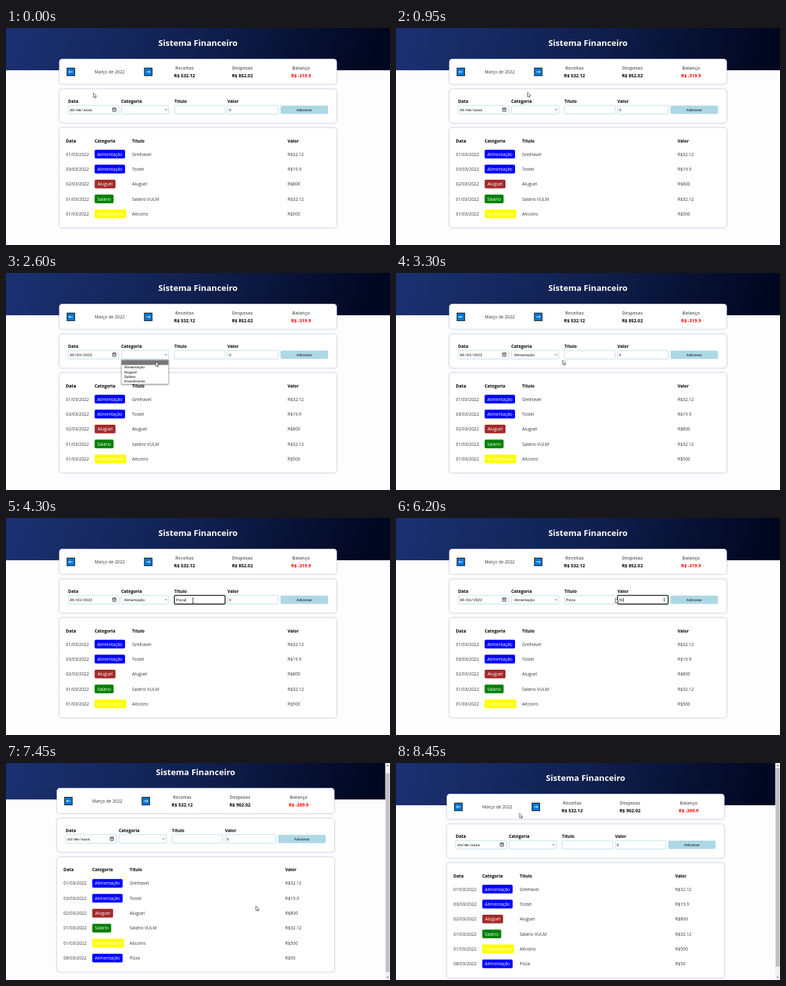
Recreate the animation shown at these times as an HTML page. Size 600x339 px, loop 8.5 s.

```html
<!DOCTYPE html>
<html lang="pt-BR">
<head>
<meta charset="utf-8">
<title>Sistema Financeiro</title>
<style>
html, body { margin: 0; width: 100%; height: 100%; overflow: hidden; background: #fdfdfe; }
svg { display: block; width: 100%; height: 100%; }
text { font: 6.8px "Open Sans", "Noto Sans", sans-serif; fill: #333; white-space: pre; }
.bold { font-weight: 700; font-size: 6.7px; fill: #000; }
.title { font-weight: 700; font-size: 13.1px; fill: #fff; text-anchor: middle; }
.head { font-weight: 700; font-size: 6.9px; fill: #777; text-anchor: middle; }
.sum { font-weight: 700; font-size: 7.1px; fill: #000; text-anchor: middle; }
.neg { fill: #f00; }
.form { font: 5.87px "Liberation Sans", Arial, sans-serif; fill: #111; }
.mid { text-anchor: middle; }
.mono { font: 5.87px "Liberation Mono", monospace; fill: #111; }
.tag { fill: #fff; }
.card { fill: #fff; stroke: #e3e5f0; stroke-width: .7; filter: drop-shadow(0 0 1px rgba(50, 60, 120, .35)); }
.field { fill: #fff; stroke: #add8e6; stroke-width: .8; }
.ring { fill: none; stroke: #101010; stroke-width: 1.3; }
.menu { fill: #fff; stroke: #888; stroke-width: .5; filter: drop-shadow(.6px 1px 1px rgba(0, 0, 0, .4)); }
.line { fill: none; stroke: #222; stroke-width: .8; }
</style>
</head>
<body>
<svg id="stage" viewBox="0 0 600 339">
  <defs>
    <linearGradient id="navy" gradientUnits="userSpaceOnUse" x1="40" y1="-50" x2="545" y2="120">
      <stop offset="0" stop-color="#1b3070"/>
      <stop offset=".5" stop-color="#10204f"/>
      <stop offset="1" stop-color="#020721"/>
    </linearGradient>
  </defs>
</svg>
<script>
const LOOP = 8500, STEP = 50;
const ROW_TOP = 197, ROW_GAP = 23.35;
const BAR = 7.46, MAX_SCROLL = 14, PAGE_H = 353;

const stage = document.getElementById('stage');

function add(parent, tag, attrs = {}, content) {
  const el = document.createElementNS('http://www.w3.org/2000/svg', tag);
  for (const key in attrs) el.setAttribute(key, attrs[key]);
  if (content !== undefined) el.textContent = content;
  parent.append(el);
  return el;
}
const group = parent => add(parent, 'g');
const label = (parent, x, y, content, cls = '') => add(parent, 'text', { x, y, class: cls }, content);
const box = (parent, x, y, width, height, attrs) => add(parent, 'rect', { x, y, width, height, ...attrs });
const path = (parent, d, attrs) => add(parent, 'path', { d, ...attrs });
const show = (el, on) => { el.style.display = on ? '' : 'none'; };
const place = (el, x, y) => el.setAttribute('transform', `translate(${x} ${y})`);
const put = (el, content) => { if (el.textContent !== content) el.textContent = content; };

// Page
const banner = box(stage, 0, 0, 600, 66, { fill: 'url(#navy)' });
const page = group(stage);
label(page, 300, 28.3, 'Sistema Financeiro', 'title');
box(page, 83.3, 48.4, 433.4, 39.2, { rx: 4.5, class: 'card' });
box(page, 83.3, 95.6, 433.4, 52.6, { rx: 4.5, class: 'card' });
const tableCard = box(page, 83.3, 156, 433.4, 156, { rx: 4.5, class: 'card' });

// Month and totals
function arrowButton(x, dir) {
  const g = group(page);
  place(g, x, 68.6);
  box(g, -6, -6, 12, 12, { fill: '#0078d7', stroke: '#111', 'stroke-width': 1 });
  path(g, `M${-3 * dir} 0H${3 * dir}M${1.2 * dir} -1.8L${3 * dir} 0L${1.2 * dir} 1.8`,
    { fill: 'none', stroke: '#fff', 'stroke-width': .9 });
}
arrowButton(101.3, -1);
arrowButton(222.2, 1);
label(page, 162, 71, 'Março de 2022', 'mid');
const [, spent, balance] = [
  [279, 'Receitas', 'R$ 532.12', ''],
  [369.3, 'Despesas', '', ''],
  [461, 'Balanço', '', ' neg']
].map(([x, name, value, cls]) => {
  label(page, x, 65, name, 'head');
  return label(page, x, 76.6, value, 'sum' + cls);
});

// Form
[[97, 'Data'], [180, 'Categoria'], [263, 'Título'], [346, 'Valor']]
  .forEach(([x, name]) => label(page, x, 116.8, name, 'bold'));
const fieldX = { date: 97.3, kind: 180.3, name: 263.3, value: 346.3 };
const rings = {};
for (const key in fieldX) {
  const w = key === 'kind' ? 74 : 79;
  box(page, fieldX[key], 121, w, 13.4, { rx: 1.2, class: 'field' });
  if (key !== 'kind') rings[key] = box(page, fieldX[key] - .2, 120.9, w + .2, 13.6, { rx: 1.5, class: 'ring' });
}
const dateText = label(page, 99.6, 129.8, '', 'mono');
const kindText = label(page, 184.4, 129.8, '', 'form');
const nameText = label(page, 265.6, 129.8, '', 'form');
const picked = box(page, 348.3, 124.3, 3.6, 7, { fill: '#0078d7' });
const valueText = label(page, 348.5, 129.8, '', 'form');
const caret = box(page, 0, 124.2, .5, 7, { fill: '#000' });

const icon = group(page);
box(icon, 166.6, 124.8, 5.2, 5.6, { rx: .6, class: 'line' });
path(icon, 'M166.6 126.4H171.8M168 124V125M170.4 124V125M168 128.4H170.4', { class: 'line' });
path(page, 'M248.4 126.9L249.9 128.4L251.4 126.9', { class: 'line' });
const spinner = path(page, 'M417.6 127L419.2 124.9L420.8 127ZM417.6 128.4L419.2 130.5L420.8 128.4Z', { fill: '#444' });
box(page, 429, 121.2, 74.2, 13, { rx: 2, fill: '#add8e6' });
label(page, 466, 129.8, 'Adicionar', 'form mid');

// Table
[[93.5, 'Data'], [138.5, 'Categoria'], [197, 'Título'], [440, 'Valor']]
  .forEach(([x, name]) => label(page, x, 178.5, name, 'bold'));
const kinds = {
  'Alimentação': ['#00f', 47.5],
  'Aluguel': ['#a52a2a', 32.6],
  'Salário': ['#008000', 29.6],
  'Investimento': ['#ff0', 49.5]
};
const rows = [
  ['01/03/2022', 'Alimentação', 'Grelhavel', 'R$32.12'],
  ['03/03/2022', 'Alimentação', 'Tostel', 'R$19.9'],
  ['02/03/2022', 'Aluguel', 'Aluguel', 'R$800'],
  ['01/03/2022', 'Salário', 'Salário VULM', 'R$32.12'],
  ['01/03/2022', 'Investimento', 'Altcoins', 'R$500'],
  ['08/03/2022', 'Alimentação', 'Pizza', 'R$50']
].map(([date, kind, name, value], i) => {
  const g = group(page), [fill, width] = kinds[kind];
  place(g, 0, ROW_TOP + i * ROW_GAP);
  label(g, 93.5, 2.5, date);
  box(g, 138.5, -6.8, width, 13.6, { rx: 2, fill });
  label(g, 138.5 + width / 2, 2.5, kind, 'tag mid');
  label(g, 197, 2.5, name);
  label(g, 440, 2.5, value);
  return g;
});
const newRow = rows[5];

// Category menu
const menu = group(page);
box(menu, 180.2, 135.4, 73.8, 38.2, { class: 'menu' });
const hover = box(menu, 180.5, 136.2, 73.2, 7.4, { fill: '#767676' });
const options = ['', ...Object.keys(kinds)].map((kind, i) =>
  label(menu, 184.4, 142.2 + i * 7.25, kind, 'form'));

// Scrollbar
const bar = group(stage);
box(bar, 600 - BAR, 0, BAR, 339, { fill: '#f1f1f1' });
path(bar, 'M594.7 5L596.3 3L597.9 5ZM594.7 334L596.3 336L597.9 334Z', { fill: '#505050' });
const track = 323;
const thumb = box(bar, 593.2, 8, 6.2, track * 339 / PAGE_H, { fill: '#c1c1c1' });

// Pointers
const arrow = path(stage, 'M0 0V7.2L1.7 5.7L2.8 8.2L4 7.7L2.9 5.3H5.1Z',
  { fill: '#fff', stroke: '#222', 'stroke-width': .65, 'stroke-linejoin': 'round' });
const beam = path(stage, 'M-1.4 -3.6H1.4M0 -3.6V3.6M-1.4 3.6H1.4', { class: 'line' });

// Timeline tables: [time, value...]
const moves = [
  [0, 136.5, 101.5], [950, 205.5, 100.5], [1300, 112, 127], [2000, 112, 127],
  [2250, 234, 128], [2300, 234, 128], [2450, 234, 138.5], [2650, 234, 138.5],
  [2950, 212, 147], [3100, 212, 147], [3450, 292, 129], [4350, 292, 129],
  [4500, 318, 128], [4800, 400, 127], [4950, 400, 127], [5350, 343, 125.5],
  [6300, 343, 125.5], [6550, 466, 127], [6650, 466, 127], [6850, 390.5, 223.5],
  [7500, 390.5, 223.5], [8450, 193, 78.5]
];
const scrolls = [[0, 0], [6700, 0], [6850, MAX_SCROLL], [7350, MAX_SCROLL], [7600, 0]];
const dates = [
  [0, 'dd/mm/aaaa'], [1450, '09/mm/aaaa'], [1650, '09/03/aaaa'],
  [1750, '09/03/0002'], [1800, '09/03/0020'], [1850, '09/03/0202'],
  [1900, '09/03/2022'], [6600, 'dd/mm/aaaa']
];
const names = [
  [0, ''], [3700, 'P'], [3800, 'Pi'], [3900, 'Piz'], [4000, 'Pizz'], [4150, 'Pizza'], [6600, '']
];
const values = [[0, '0'], [5650, '5'], [5800, '50'], [6600, '0']];
const focus = [[0, ''], [1350, 'date'], [2300, ''], [3500, 'name'], [4850, 'value'], [6600, '']];

const at = (table, t) => table.findLast(entry => entry[0] <= t)[1];

function tween(table, t) {
  const i = table.findLastIndex(entry => entry[0] <= t);
  const a = table[i], b = table[i + 1];
  if (!b) return a.slice(1);
  const k = (t - a[0]) / (b[0] - a[0]), ease = k * k * (3 - 2 * k);
  return a.slice(1).map((v, j) => v + (b[j + 1] - v) * ease);
}

function render(t) {
  const added = t >= 6600;
  const [scroll] = tween(scrolls, t);
  const [x, y] = tween(moves, t);
  const active = at(focus, t);

  place(page, added ? -BAR / 2 : 0, -scroll);
  place(banner, 0, -scroll);
  show(bar, added);
  thumb.setAttribute('y', 8 + scroll * track / PAGE_H);
  show(newRow, added);
  tableCard.setAttribute('height', added ? 156 + ROW_GAP : 156);
  put(spent, added ? 'R$ 902.02' : 'R$ 852.02');
  put(balance, added ? 'R$ -369.9' : 'R$ -319.9');

  put(dateText, at(dates, t));
  put(kindText, t >= 3050 && !added ? 'Alimentação' : '');
  put(nameText, at(names, t));
  put(valueText, at(values, t));
  for (const key in rings) show(rings[key], key === active);
  show(spinner, active === 'value');

  const selecting = t >= 5150 && t < 5650;
  show(picked, selecting);
  valueText.style.fill = selecting ? '#fff' : '';
  const typed = { name: nameText, value: valueText }[active];
  show(caret, typed && !selecting);
  if (typed) caret.setAttribute('x', +typed.getAttribute('x') + typed.getComputedTextLength() + .3);

  show(menu, t >= 2300 && t < 3050);
  const index = Math.max(0, Math.min(4, Math.floor((y - 136.2) / 7.25)));
  hover.setAttribute('y', 136.2 + index * 7.25);
  options.forEach((option, i) => { option.style.fill = i === index ? '#fff' : ''; });

  const overText = y > 121 && y < 134 && (x > 263 && x < 342 || x > 346 && x < 416);
  show(arrow, !overText);
  show(beam, overText);
  place(arrow, x, y);
  place(beam, x, y);
}

const start = performance.now();
function tick() {
  const t = (performance.now() - start) % LOOP;
  render(Math.floor(t / STEP) * STEP);
  requestAnimationFrame(tick);
}
tick();
</script>
</body>
</html>
```
